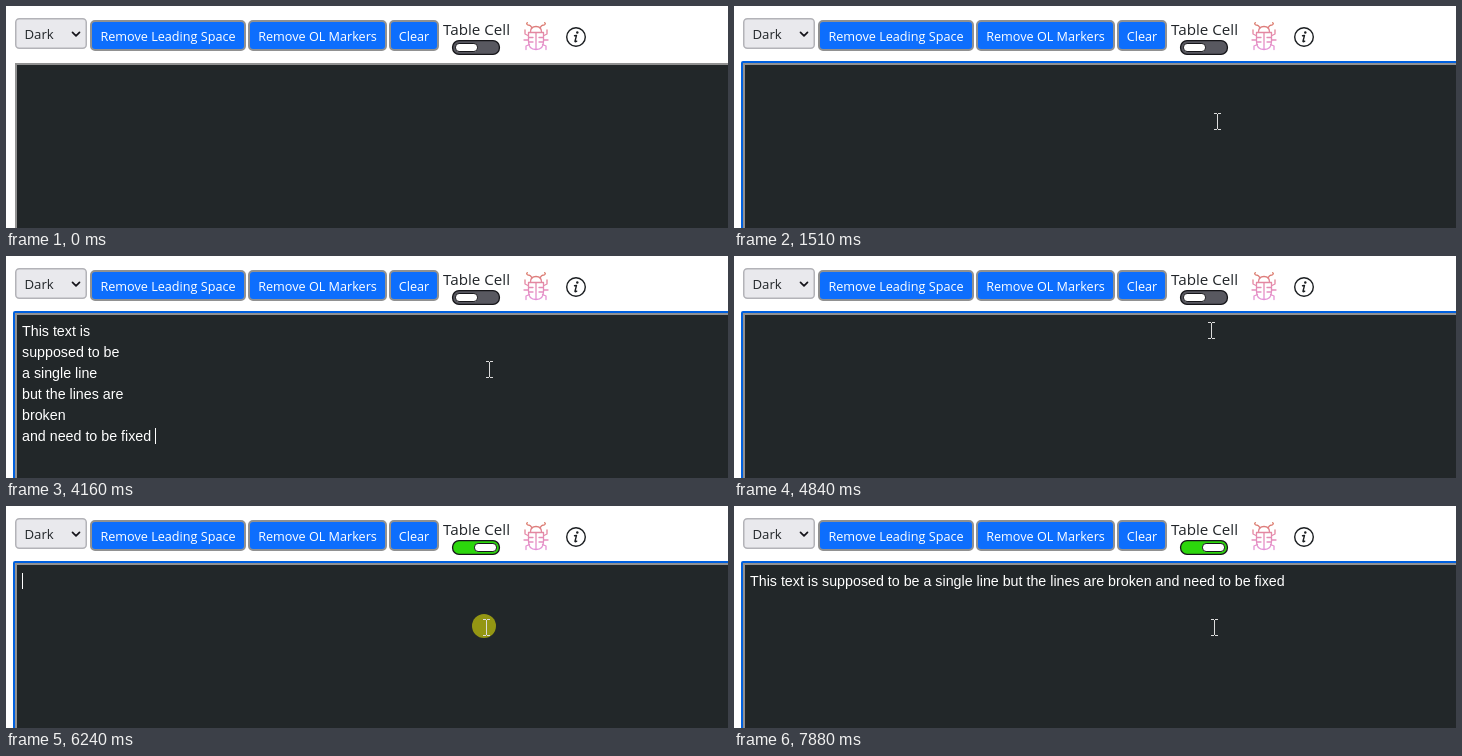
Recreate the animation shown at these times as an HTML page. Size 722x222 px, loop 8000 ms.

```html
<!DOCTYPE html>
<html lang="en">
<head>
<meta charset="utf-8">
<title>Text cleaner</title>
<style>
  html, body { margin: 0; width: 100%; height: 100%; overflow: hidden; background: #fff; }
  svg { display: block; width: 722px; height: 222px; }
  .ui { font-family: "Open Sans", "Noto Sans", sans-serif; fill: #212529; }
  .button rect { fill: #0d6efd; stroke: #919191; stroke-width: 2; }
  .button text { font-size: 12.65px; fill: #fff; }
  .area { font: 14.25px "Liberation Sans", Arial, sans-serif; fill: #fff; white-space: pre; }
  .line { fill: none; stroke-linecap: round; stroke-linejoin: round; }
</style>
</head>
<body>
<svg viewBox="0 0 722 222">
  <defs>
    <linearGradient id="pink" gradientUnits="userSpaceOnUse" x1="0" y1="16" x2="0" y2="45">
      <stop offset="0" stop-color="#d9765f"/>
      <stop offset=".4" stop-color="#e58aa8"/>
      <stop offset="1" stop-color="#e493dc"/>
    </linearGradient>
  </defs>

  <g class="ui">
    <rect x="9.75" y="12.75" width="70.5" height="29.5" rx="3.5" fill="#e9e9ed" stroke="#b3b3b8" stroke-width="1.5"/>
    <text x="18.5" y="33" font-size="13.2">Dark</text>
    <path class="line" d="M66.5 26.3l3.5 3.5 3.5-3.5" stroke="#15141a" stroke-width="1.7"/>
    <g id="buttons"></g>
    <text x="437" y="28.7" font-size="15.2">Table Cell</text>
  </g>

  <rect id="track" x="446.6" y="34.6" width="46.8" height="13.8" rx="6.5" stroke="#16161a" stroke-width="1.3"/>
  <rect id="knob" x="449.5" y="37.5" width="22" height="8" rx="3.6" fill="#fff" stroke="#16161a"/>

  <g class="line" stroke="url(#pink)" stroke-width="1.3">
    <path d="M526 22q-1-3-4.500-3.200q-1.500-1-.2-2.100M534 22q1-3 4.500-3.200q1.500-1 .2-2.100"/>
    <path d="M524.500 26q0-5.500 5.500-5.500t5.500 5.500"/>
    <path d="M522.500 26.500h15v9q0 8-7.500 8t-7.500-8zM530 27v16M523 31.500h4M533 31.500h4M523 36h4M533 36h4"/>
    <path d="M522 29.500l-3-1.500v-4M538 29.500l3-1.500v-4M522 34h-4M538 34h4M523.500 38.500l-3.500 1.500v3.500M536.500 38.500l3.500 1.500v3.500"/>
  </g>

  <circle cx="570" cy="31" r="9.300" fill="none" stroke="#1b1e21" stroke-width="1.400"/>
  <circle cx="571.300" cy="26.500" r="1.200" fill="#1b1e21"/>
  <path class="line" d="M568.500 29.700l2-.3-1.500 5.800q-.1 1.200 1.700 0" stroke="#1b1e21" stroke-width="1.400"/>

  <rect id="ring" x="7" y="55" width="740" height="200" rx="2" fill="#0060df"/>
  <rect x="9" y="57" width="740" height="200" fill="#919191"/>
  <rect x="11" y="59" width="740" height="200" fill="#222729"/>
  <g id="broken" class="area"></g>
  <g id="joined" class="area"></g>
  <rect id="caret" width="1" height="16" fill="#fff"/>

  <circle id="click" r="12" fill="#fafa00" opacity=".53"/>
  <g id="beam">
    <path d="M-3 -7.500H0M1 -7.500H4M.5 -7V8M-3 8.500H0M1 8.500H4" fill="none" stroke="#dcdcdc"/>
  </g>
  <g id="arrow">
    <path d="M-.8 -.6V15.600L2.900 12.200 5.400 18 8.100 16.900 5.600 11.200H10.500Z" fill="#fff" stroke="#111" stroke-width=".9"/>
  </g>
  <g id="hand" class="line" stroke="#111">
    <path d="M-2 1.300Q0-1.400 2 1.300V7.500Q4 6 5.500 8.300Q7.700 7 8.500 9.300Q10.600 8.700 10.600 11.200V15Q10.600 18 8.700 21.500H-2.500Q-3.500 18-7 13.500Q-7.800 10.600-5 11.300L-2 14Z" fill="#fff"/>
    <path d="M2 7.500V11M5.500 8.500V11.500M8.500 9.500V12"/>
  </g>
</svg>
<script>
const LOOP = 8000;
const SVG = "http://www.w3.org/2000/svg";
const $ = id => document.getElementById(id);

function add(parent, tag, attrs, text = "") {
  const el = document.createElementNS(SVG, tag);
  for (const key in attrs) el.setAttribute(key, attrs[key]);
  el.textContent = text;
  return parent.appendChild(el);
}

for (const [label, x, width] of [
  ["Remove Leading Space", 84, 156],
  ["Remove OL Markers", 242, 139],
  ["Clear", 383, 50],
]) {
  const g = add($("buttons"), "g", { class: "button" });
  add(g, "rect", { x: x + 1, y: 15, width: width - 2, height: 29, rx: 4 });
  add(g, "text", { x: x + width / 2, y: 35, "text-anchor": "middle" }, label);
}

const lines = ["This text is", "supposed to be", " a single line",
  "but the lines are", "  broken", " and need to be fixed"];
lines.forEach((line, i) => add($("broken"), "text", { x: 16, y: 80 + 21 * i }, line));
add($("joined"), "text", { x: 16, y: 80 }, lines.map(s => s.trim()).join(" "));

// Pointer steps: time, shape, x, y
const pointer = [
  [0, "", 0, 0],
  [210, "beam", 644, 199], [290, "beam", 586, 172], [370, "beam", 535, 146],
  [440, "beam", 504, 128], [520, "beam", 488, 118], [600, "beam", 483, 115],
  [2210, "arrow", 483, 115], [2920, "beam", 483, 115], [3610, "beam", 483, 113],
  [4620, "beam", 482, 108], [4700, "beam", 480, 93], [4780, "beam", 477, 74],
  [4850, "arrow", 474, 54], [4930, "hand", 472, 45],
  [5080, "hand", 471, 41], [5160, "hand", 470, 38],
  [5630, "hand", 470, 40], [5700, "hand", 471, 45], [5780, "arrow", 472, 55],
  [5860, "beam", 475, 75], [5940, "beam", 478, 99], [6010, "beam", 480, 115],
  [6090, "beam", 480, 121], [7160, "arrow", 480, 121], [7880, "beam", 480, 121],
];

// Time spans during which each part is visible
const spans = {
  ring: [[900, 5470], [6240, LOOP]],
  click: [[900, 990], [5470, 5530], [6240, 6320]],
  broken: [[2210, 4390], [7110, 7880]],
  joined: [[7880, LOOP]],
  caret: [[900, 1510], [2060, 2610], [3080, 3610], [4160, 4690],
    [5240, 5470], [6240, 6800], [7110, 7330]],
};

const within = (name, t) => spans[name].some(([from, to]) => t >= from && t < to);
const show = (id, on) => $(id).style.display = on ? "" : "none";
const mix = (a, b, k) => a + (b - a) * k;

function draw(t) {
  for (const name in spans) show(name, within(name, t));

  const pasted = within("broken", t);
  $("caret").setAttribute("x", pasted ? 149 : 16);
  $("caret").setAttribute("y", pasted ? 172 : 67);

  const k = Math.min(1, Math.max(0, (t - 5530) / 250));
  const ease = k * k * (3 - 2 * k);
  $("knob").setAttribute("x", mix(449.5, 468.5, ease));
  $("track").setAttribute("fill",
    `rgb(${mix(88, 44, ease)},${mix(88, 214, ease)},${mix(96, 12, ease)})`);

  const [, shape, x, y] = pointer.findLast(step => step[0] <= t);
  for (const id of ["beam", "arrow", "hand"]) {
    show(id, id === shape);
    $(id).setAttribute("transform", `translate(${x} ${y})`);
  }
  $("click").setAttribute("cx", x - 2);
  $("click").setAttribute("cy", y - 1);
}

const start = performance.now();
function tick() {
  draw((performance.now() - start) % LOOP);
  requestAnimationFrame(tick);
}
tick();
</script>
</body>
</html>
```
